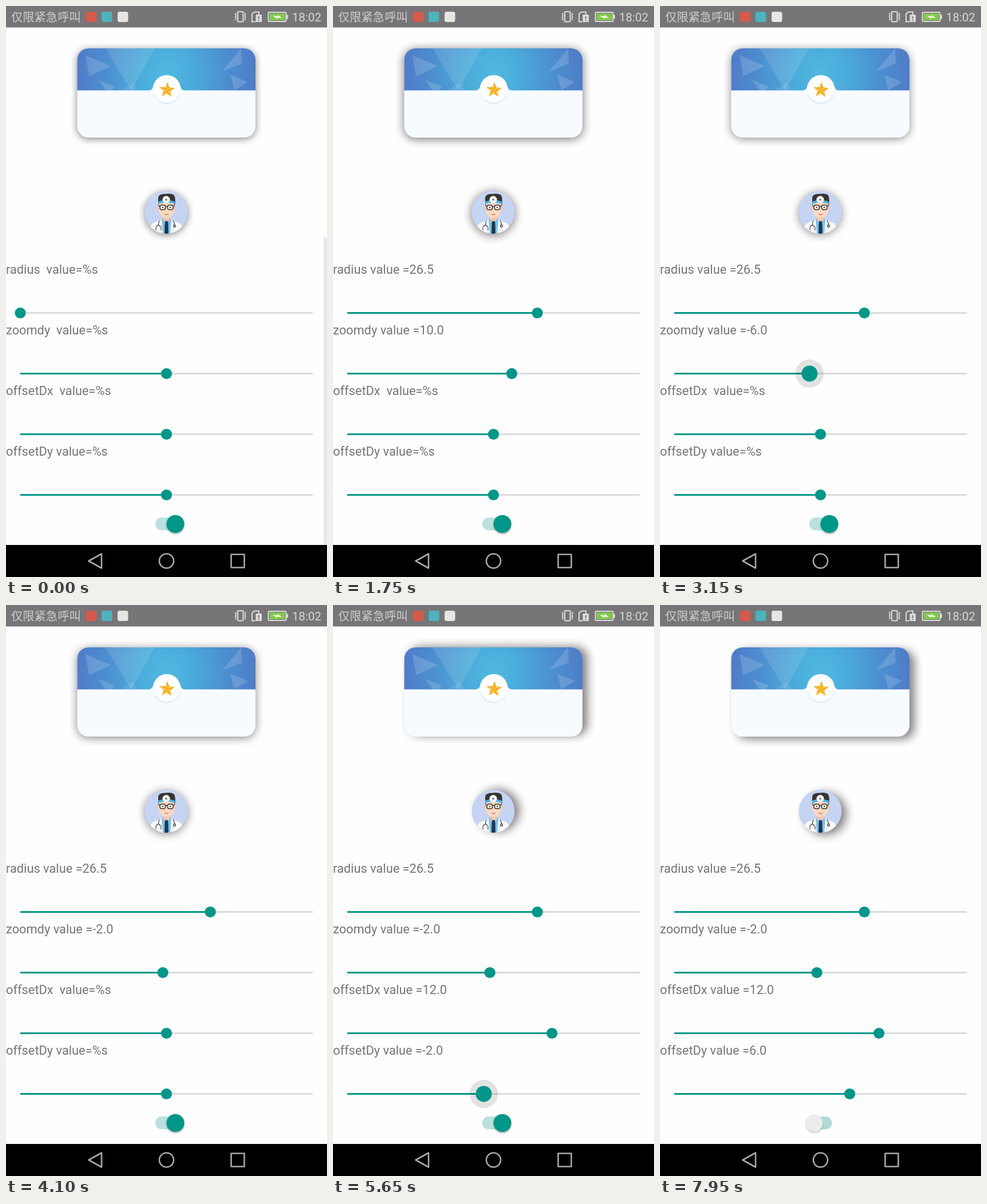
These frames come from a looping animation (561 by 998 pixels, 8 s). An HTML page:

```html
<!DOCTYPE html>
<html lang="en">
<head>
<meta charset="utf-8">
<title>Shadow sliders</title>
<style>
  html, body { margin: 0; width: 100%; height: 100%; overflow: hidden; background: #fefefe; }
  svg { display: block; width: 561px; height: 998px; }
  text { font-family: Roboto, sans-serif; white-space: pre; }
  .zh { font-family: "Noto Sans CJK SC", "Noto Sans CJK", sans-serif; }
</style>
</head>
<body>
<svg viewBox="0 0 561 998" xmlns="http://www.w3.org/2000/svg">
  <defs>
    <radialGradient id="sky" gradientUnits="userSpaceOnUse" cx="280" cy="118" r="155">
      <stop offset="0" stop-color="#50b9e0"/>
      <stop offset=".3" stop-color="#4bacdb"/>
      <stop offset=".68" stop-color="#4c8fd0"/>
      <stop offset="1" stop-color="#4f7dc8"/>
    </radialGradient>
    <filter id="blur" filterUnits="userSpaceOnUse" x="40" y="0" width="480" height="480" color-interpolation-filters="sRGB">
      <feGaussianBlur id="gauss" stdDeviation="6"/>
    </filter>
    <filter id="soft" x="-40%" y="-40%" width="180%" height="180%"><feGaussianBlur stdDeviation="1.6"/></filter>
    <clipPath id="cardClip"><rect x="124.5" y="74" width="311.5" height="156" rx="20"/></clipPath>
    <clipPath id="faceClip"><circle cx="280" cy="360.5" r="37.5"/></clipPath>
    <clipPath id="cardBox"><rect id="cardBoxRect"/></clipPath>
    <clipPath id="faceBox"><rect id="faceBoxRect"/></clipPath>
  </defs>

  <rect width="561" height="998" fill="#fefefe"/>

  <g fill="#100508" fill-opacity=".5">
    <g clip-path="url(#cardBox)"><rect id="cardShade" filter="url(#blur)"/></g>
    <g clip-path="url(#faceBox)"><rect id="faceShade" filter="url(#blur)"/></g>
  </g>

  <g clip-path="url(#cardClip)">
    <rect x="124" y="74" width="313" height="157" fill="#f7fbff"/>
    <rect x="124" y="74" width="313" height="73.5" fill="url(#sky)"/>
    <g fill="#fff" fill-opacity=".15">
      <path d="M139 86L183 105L145 123Z"/>
      <path d="M174 74H260L219 147.500L211 135Z" fill-opacity=".11"/>
      <path d="M161 129L190 141L185 147.500H174Z"/>
      <path d="M200 147.500L222 134L230 147.500Z" fill-opacity=".1"/>
      <path d="M411 74L378 114L412 101Z"/>
      <path d="M392 120L423 133L399 147.500Z"/>
    </g>
    <circle cx="281" cy="146.500" r="24.500" fill="#d5e6f1"/>
    <path d="M249 148Q256 147 257.500 140A24.500 24.500 0 0 1 304.500 140Q306 147 313 148Z" fill="#fbfdff"/>
    <circle cx="281" cy="145" r="24.300" fill="#fdfeff"/>
    <g id="star" transform="translate(281.500 147) rotate(3)"></g>
  </g>

  <g clip-path="url(#faceClip)">
    <rect x="242" y="322" width="76" height="77" fill="#c5d4f3"/>
    <path d="M251 399Q251 382 258 379L272 373H288L302 379Q309 382 310 399Z" fill="#f8f8f8"/>
    <path d="M272 372H289L287 399H274Z" fill="#79c3ea"/>
    <path d="M274 364H287V373L280.500 379L274 373Z" fill="#f3c4a8"/>
    <path d="M278.500 376H282.500L283.500 380L284 399H277L277.500 380Z" fill="#20364c"/>
    <path d="M272 372L266 381L273 399M289 372L295 381L288 399" fill="none" stroke="#dce1e6" stroke-width="1.300"/>
    <circle cx="266.500" cy="353" r="3" fill="#f3c4a8"/><circle cx="294.500" cy="353" r="3" fill="#f3c4a8"/>
    <path d="M267 341H294V356Q293 369 280.500 371Q268 369 267 356Z" fill="#fbd8c0"/>
    <path d="M266 350V336Q266 328 278 328.500Q290 327 294 331Q297 336 295 350L293 343H268Z" fill="#393431"/>
    <path d="M266 342Q280 336 295 342V346Q280 341 266 346Z" fill="#4db2e4"/>
    <circle cx="280" cy="338.500" r="6.300" fill="#f7fafc" stroke="#ced9e1" stroke-width=".8"/>
    <circle cx="280" cy="338.500" r="1.600" fill="#555"/>
    <g fill="#fff2e8" stroke="#3b302d" stroke-width="1.500">
      <rect x="269" y="348" width="9.500" height="8" rx="3"/>
      <rect x="282.500" y="348" width="9.500" height="8" rx="3"/>
      <path d="M278.500 350.500H282.500M266.500 349.500H269M292 349.500H294.500" fill="none"/>
    </g>
    <circle cx="274" cy="352" r="1.200" fill="#333"/><circle cx="287" cy="352" r="1.200" fill="#333"/>
    <path d="M277 363.500Q280.500 366 284 363.500" fill="none" stroke="#c8755f" stroke-width="1.300"/>
    <g fill="none" stroke="#555b62" stroke-width="1.300">
      <path d="M268 375Q266 379 266.500 384M262 392V387Q266 379 271 387V392M292 375Q295 379 294.500 383"/>
      <circle cx="294.500" cy="384.500" r="2" fill="#c4cbd1"/>
    </g>
  </g>

  <rect id="bar" x="555" y="405" width="6" height="537" fill="#e8e8ea"/>
  <g id="sliders"></g>

  <rect id="rail" x="261" y="894" width="39.500" height="22.500" rx="11.250"/>
  <circle id="knobShade" cy="907.500" r="15.500" fill="#000" fill-opacity=".3" filter="url(#soft)"/>
  <circle id="knob" cy="905.300" r="15.600"/>

  <rect width="561" height="37.500" fill="#777577"/>
  <text class="zh" x="9" y="26.500" font-size="20.300" fill="#d0cfd0">仅限紧急呼叫</text>
  <rect x="139.500" y="10" width="18.500" height="18" rx="3.500" fill="#d55a4c"/>
  <rect x="167" y="10" width="18.500" height="18" rx="3.500" fill="#4db3bc"/>
  <rect x="195" y="10" width="18.500" height="18" rx="3.500" fill="#e6e6e3"/>
  <g fill="none" stroke="#dcdcdc" stroke-width="2">
    <rect x="405" y="10" width="9.500" height="17.500" rx="1"/>
    <path d="M402.500 12L400.500 14.500L402.500 17L400.500 19.500L402.500 22L400.500 25M417 12L419 14.500L417 17L419 19.500L417 22L419 25" stroke-width="1.600"/>
    <path d="M436 27.500H430V14L434 10.500H442V15"/>
    <rect x="458.500" y="11" width="31" height="16" rx="2"/>
  </g>
  <rect x="436.500" y="15" width="10.500" height="13" rx="1" fill="#dcdcdc"/>
  <path d="M441.700 18V22.500M441.700 24V26" stroke="#777577" stroke-width="2"/>
  <rect x="490" y="15.500" width="2.800" height="7" fill="#dcdcdc"/>
  <rect x="460.500" y="13" width="27" height="12" fill="#83c94c"/>
  <path d="M466 17L475 18L474 15L482 21L473 20.500L474.500 23Z" fill="#f4f8ee"/>
  <text x="500" y="26.600" font-size="20.500" fill="#d8d8d8">18:02</text>

  <rect y="942" width="561" height="56" fill="#000"/>
  <g fill="none" stroke="#a9a9a9" stroke-width="2.600" stroke-linejoin="round">
    <path d="M144.500 970L167 957.500V982.500Z"/>
    <circle cx="280.500" cy="970" r="12.500"/>
    <rect x="393.500" y="958.500" width="23" height="23"/>
  </g>
</svg>
<script>
const LOOP = 8000, X0 = 25, X1 = 536, TEAL = "#009688";
const $ = id => document.getElementById(id);
const clamp = v => Math.max(0, Math.min(1, v));
const ramp = (t, from, to) => clamp((t - from) / (to - from));
const mix = (a, b, p) => a + (b - a) * p;

function set(el, attrs) {
  for (const k in attrs) el.setAttribute(k, attrs[k]);
  return el;
}
function add(parent, tag, attrs) {
  return parent.appendChild(set(document.createElementNS("http://www.w3.org/2000/svg", tag), attrs));
}

// keys: [time, value] pairs along the drag; initial: value in force before the first touch
const sliders = [
  { name: "radius", idle: "radius  value=%s", min: 0.5, max: 40.5, rest: 0.5, initial: 20,
    down: 60, up: 1350, keys: [[100, 0.5], [750, 24.7], [950, 28.5], [1200, 26.5]] },
  { name: "zoomdy", idle: "zoomdy  value=%s", min: -80, max: 80, rest: 0, initial: 0,
    down: 1750, up: 3750, keys: [[1750, 10], [2150, 20], [2800, -12], [3150, -6], [3500, -2]] },
  { name: "offsetDx", idle: "offsetDx  value=%s", min: -30, max: 30, rest: 0, initial: 0,
    down: 4200, up: 5250, keys: [[4250, 0], [4480, -4], [4650, -2], [5080, 12]] },
  { name: "offsetDy", idle: "offsetDy value=%s", min: -30, max: 30, rest: 0, initial: 3,
    down: 5450, up: 7000, keys: [[5500, 0], [5980, -9], [6350, 10], [6500, 12], [6850, 6]] }
];

sliders.forEach((s, i) => {
  const g = $("sliders"), y = 536.5 + 106 * i;
  s.label = add(g, "text", { x: 0, y: y - 68.5, "font-size": 21.8, fill: "#757575" });
  add(g, "path", { d: `M${X0} ${y}H${X1}`, stroke: "#dbdbdb", "stroke-width": 3 });
  s.fill = add(g, "line", { x1: X0, y1: y, y2: y, stroke: TEAL, "stroke-width": 3 });
  s.halo = add(g, "circle", { cy: y, r: 24.7, fill: "#000" });
  s.thumb = add(g, "circle", { cy: y, fill: TEAL });
});

// faceted star: each arm has a light and a dark half
const polar = (r, k) => {
  const a = (k * 36 - 90) * Math.PI / 180;
  return `${(r * Math.cos(a)).toFixed(2)} ${(r * Math.sin(a)).toFixed(2)}`;
};
for (let k = 0; k < 10; k++) {
  const r = n => n % 2 ? 5.8 : 13;
  add($("star"), "path", {
    d: `M0 0L${polar(r(k), k)}L${polar(r(k + 1), k + 1)}Z`,
    fill: k % 2 ? "#ffcf3d" : "#f7a51c", stroke: "#f6ae2b", "stroke-width": 0.7, "stroke-linejoin": "round"
  });
}

function track(keys, t) {
  let [t0, v0] = keys[0];
  for (const [t1, v1] of keys) {
    if (t < t1) return mix(v0, v1, clamp((t - t0) / (t1 - t0)));
    t0 = t1;
    v0 = v1;
  }
  return v0;
}

function drawSlider(s, t) {
  const touched = t >= s.keys[0][0];
  const base = s.min % 2;
  const value = touched ? Math.round((track(s.keys, t) - base) / 2) * 2 + base + 0 : s.rest;
  const x = mix(X0, X1, (value - s.min) / (s.max - s.min));
  const press = ramp(t, s.down, s.down + 100) * (1 - ramp(t, s.up, s.up + 100));
  s.label.textContent = touched ? `${s.name} value =${value.toFixed(1)}` : s.idle;
  set(s.fill, { x2: x });
  set(s.halo, { cx: x, "fill-opacity": 0.11 * press });
  set(s.thumb, { cx: x, r: mix(9.6, 14, press) });
  return touched ? value : s.initial;
}

function drawShade(id, x, y, w, h, rx, grow, reach, dx, dy) {
  const box = m => ({ x: x + dx - m, y: y + dy - m, width: w + 2 * m, height: h + 2 * m });
  set($(id + "Shade"), { ...box(grow), rx: rx + grow });
  set($(id + "BoxRect"), box(grow + reach));
}

function drawSwitch(t) {
  const p = (1 - Math.cos(Math.PI * ramp(t, 7750, 8020))) / 2;
  const c = ramp(t, 7750, 7930), tint = (a, b, q) => `rgb(${a.map((v, i) => Math.round(mix(v, b[i], q)))})`;
  const x = mix(296, 265, p);
  set($("rail"), { fill: tint([186, 225, 221], [178, 219, 214], c) });
  set($("knob"), { cx: x, r: mix(15.6, 14.8, c), fill: tint([0, 150, 136], [236, 235, 237], c) });
  set($("knobShade"), { cx: x, "fill-opacity": mix(0.3, 0.16, c) });
}

function draw(t) {
  const [radius, zoom, ox, oy] = sliders.map(s => drawSlider(s, t));
  const reach = radius * 0.52, grow = zoom * 0.12, dx = ox * 0.74, dy = oy * 0.74;
  $("gauss").setAttribute("stdDeviation", radius * 0.3 + 0.2);
  drawShade("card", 124.5, 74, 311.5, 156, 20, grow, reach, dx, dy);
  drawShade("face", 242.5, 323, 75, 75, 37.5, grow, reach, dx, dy);
  $("bar").setAttribute("opacity", 1 - ramp(t, 50, 350));
  drawSwitch(t);
}

const start = performance.now();
function tick() {
  draw((performance.now() - start) % LOOP);
  requestAnimationFrame(tick);
}
tick();
</script>
</body>
</html>
```
